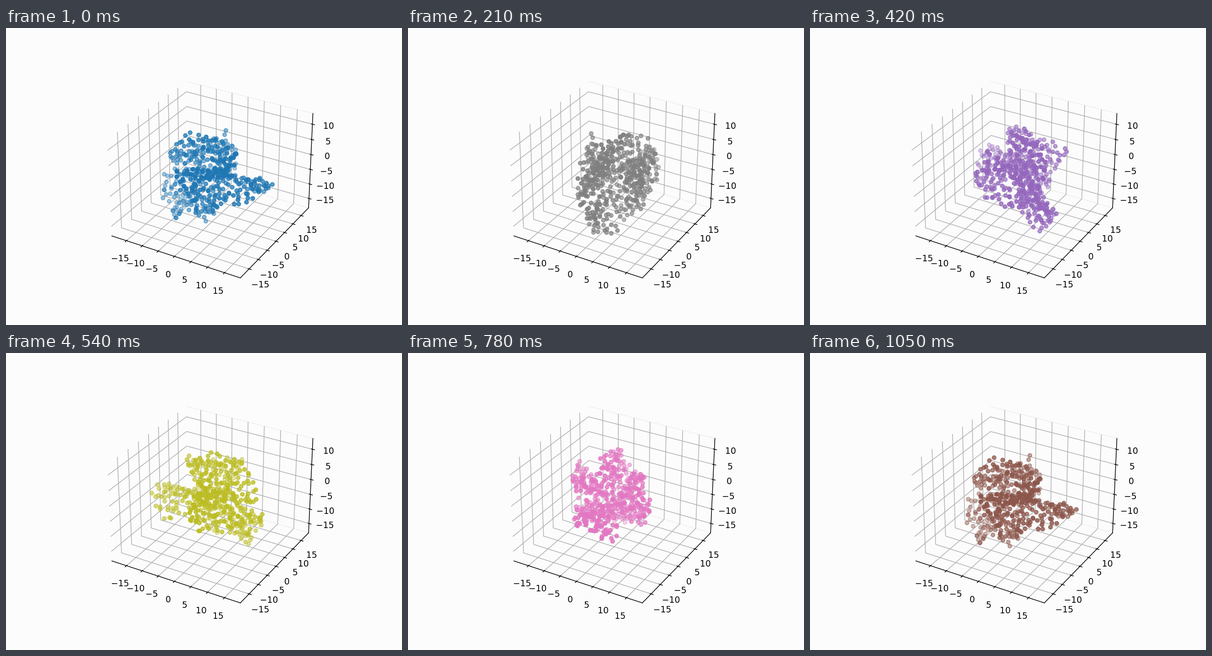
These frames come from a looping animation (864 by 648 pixels, 1.08 s). A matplotlib script:

```python
import numpy as np
import matplotlib.pyplot as plt
from matplotlib.animation import ArtistAnimation

W, H, DPI = 864, 648, 135
FRAMES, INTERVAL = 36, 30
ATOMS, SEEDS = 490, 140
PAPER = "#fcfcfc"

# Bends of the folded chain as (right, away, up) seen from the camera
BENDS = np.array([
    (-10, -4, -15), (-11, 2, -16), (-7, 4, -13), (-14, 1, -11), (-12, 6, -5),
    (-3, 8, -7), (6, 8, -7), (6, 9, 0), (4, 8, 7), (-12, 6, 0), (-10, 1, 6),
    (-7, 1, 10), (-1, -2, 12), (6, -5, 8), (5, -11, 5), (-9, -11, 4),
    (-4, -9, -9), (-1, -3, -16), (1, -10, -5), (8, -10, -5), (16, -7, -1),
    (13, 0, -8)])
CORE = np.array([0, 0, -2])


def scatter_pool(rng, n):
    """Random points on the chain, drawn towards the core and blurred."""
    t = rng.uniform(0, len(BENDS) - 1, n)
    knots = np.arange(len(BENDS))
    chain = np.column_stack([np.interp(t, knots, c) for c in BENDS.T])
    reach = 0.96 * rng.random((n, 1)) ** 0.4
    blur = rng.normal(size=(n, 3))
    blur *= 1.7 * rng.random((n, 1)) ** (1 / 3) / np.linalg.norm(
        blur, axis=1, keepdims=True)
    return CORE + reach * (chain - CORE) + blur


def grow_molecule(pool):
    """Place spaced seeds, then bond short branches onto them."""
    atoms = [pool[0]]

    def distances(p):
        return np.linalg.norm(np.array(atoms) - p, axis=1)

    for p in pool:
        if len(atoms) >= SEEDS:
            break
        if distances(p).min() > 2.7:
            atoms.append(p)
    for p in pool[::-1]:
        if len(atoms) >= ATOMS:
            break
        d = distances(p)
        if 1.25 < d.min() < 1.65 and (d < 2.1).sum() <= 2:
            atoms.append(p)
    return np.array(atoms)


def spin(points, step):
    """Turn about the z axis; the last step closes the circle."""
    a = np.radians(30 + 360 * step / (FRAMES - 1))
    right, away, up = points.T
    return (right * np.cos(a) - away * np.sin(a),
            right * np.sin(a) + away * np.cos(a), up)


fig = plt.figure(figsize=(W / DPI, H / DPI), dpi=DPI, facecolor=PAPER)
ax = fig.add_subplot(projection="3d", facecolor=PAPER)
ax.set(xlim=(-19.66, 19.62), ylim=(-19.66, 19.66), zlim=(-18.28, 13.5))
for axis in (ax.xaxis, ax.yaxis, ax.zaxis):
    axis.pane.set(fill=False, edgecolor="none", alpha=None)
ax.yaxis.pane.set(edgecolor="#ebebeb", linewidth=0.6)

molecule = grow_molecule(scatter_pool(np.random.default_rng(7), 40_000))
frames = [[ax.scatter(*spin(molecule, k), color=f"C{k % 10}")]
          for k in range(FRAMES)]
anim = ArtistAnimation(fig, frames, interval=INTERVAL, repeat=True, repeat_delay=0)
plt.show()
```
